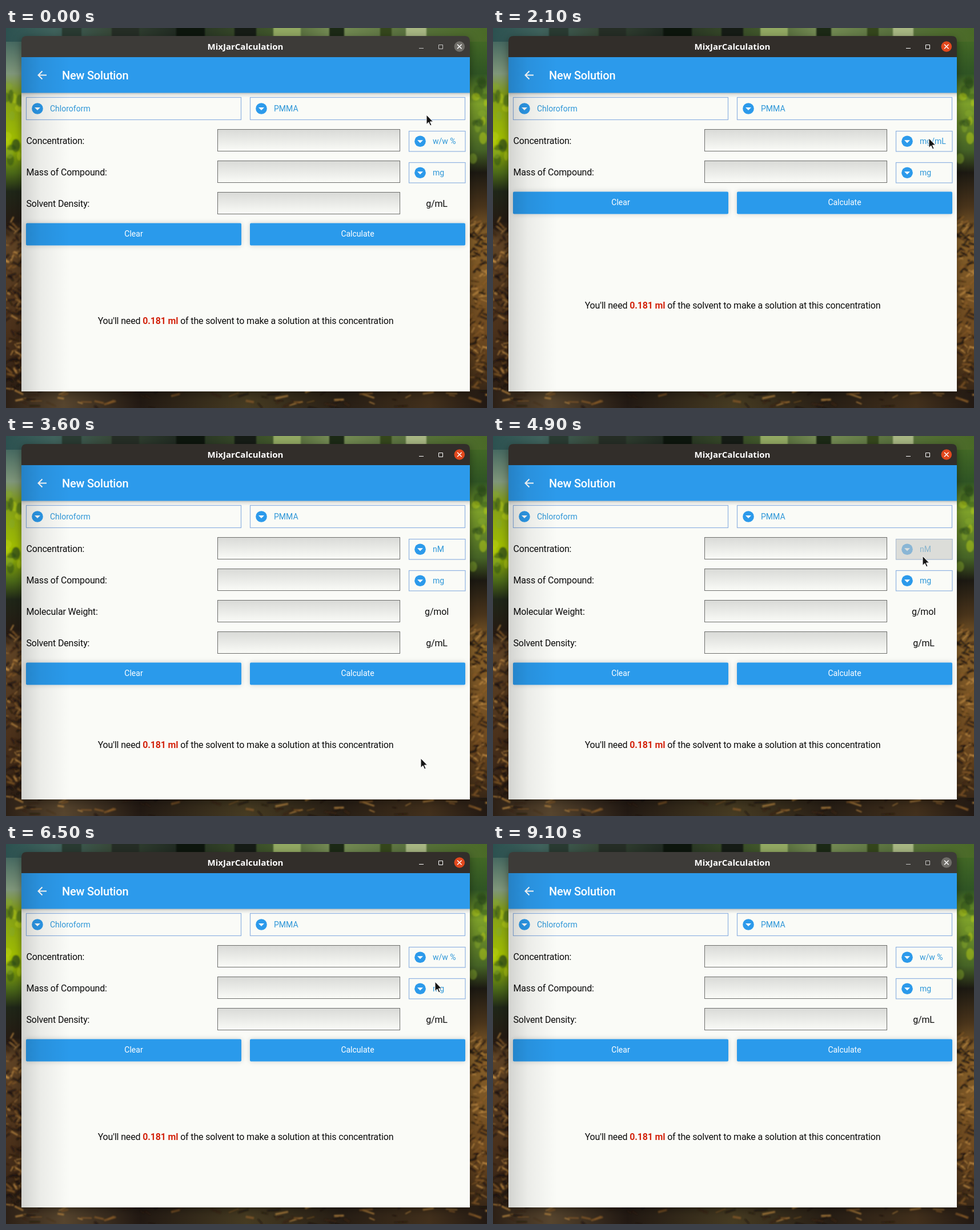
An HTML page for the animation above (9.2 s loop, 842x665 px).

```html
<!DOCTYPE html>
<html lang="en">
<head>
<meta charset="utf-8">
<title>New Solution</title>
<style>
  html, body { margin: 0; width: 100%; height: 100%; overflow: hidden; background: #2a2118; }
  #stage { display: block; width: 842px; height: 665px; }
  text { font: 16px Roboto, sans-serif; letter-spacing: -.01em; fill: #0b0b0b; white-space: pre; }
  .small { font-size: 14px; letter-spacing: 0; }
  .blue { fill: #2f97d8; }
  .white { fill: #fff; }
  .mid { text-anchor: middle; }
  .bar { font: 500 20px Roboto, sans-serif; }
  .caption { font: 700 15px "Open Sans", "Noto Sans", sans-serif; letter-spacing: 0; }
  .outline { fill: none; stroke: #8fb2e2; stroke-width: 1.2; }
  .field { fill: url(#fieldFill); stroke: #6d6e6c; }
</style>
</head>
<body>
<svg id="stage" viewBox="0 0 842 665">
  <defs>
    <linearGradient id="fieldFill" x2="0" y2="1">
      <stop offset="0" stop-color="#d9dad7"/><stop offset="1" stop-color="#fafbf7"/>
    </linearGradient>
    <linearGradient id="edgeShade">
      <stop offset="0" stop-opacity=".16"/><stop offset=".4" stop-opacity=".06"/><stop offset="1" stop-opacity="0"/>
    </linearGradient>
    <linearGradient id="barShade" x2="0" y2="1">
      <stop offset="0" stop-opacity=".24"/><stop offset=".4" stop-opacity=".09"/><stop offset="1" stop-opacity="0"/>
    </linearGradient>
    <linearGradient id="leftTone" x2="0" y2="1">
      <stop offset="0" stop-color="#2f5656"/><stop offset=".12" stop-color="#7f967a"/>
      <stop offset=".17" stop-color="#7f9a1c"/><stop offset=".3" stop-color="#a3c000"/>
      <stop offset=".38" stop-color="#4c6a18"/><stop offset=".43" stop-color="#1f2618"/>
      <stop offset=".51" stop-color="#251b13"/><stop offset=".56" stop-color="#5f4325"/>
      <stop offset=".8" stop-color="#4a301a"/><stop offset="1" stop-color="#241a13"/>
    </linearGradient>
    <linearGradient id="rightTone" x2="0" y2="1">
      <stop offset="0" stop-color="#4a7026"/><stop offset=".12" stop-color="#2f5424"/>
      <stop offset=".2" stop-color="#7da02a"/><stop offset=".32" stop-color="#466426"/>
      <stop offset=".38" stop-color="#1c1912"/><stop offset=".47" stop-color="#49341b"/>
      <stop offset=".55" stop-color="#86602a"/><stop offset=".82" stop-color="#6c4820"/>
      <stop offset="1" stop-color="#251b13"/>
    </linearGradient>
    <linearGradient id="topTone">
      <stop offset="0" stop-color="#2c5150"/><stop offset=".1" stop-color="#40635d"/>
      <stop offset=".22" stop-color="#384838"/><stop offset=".35" stop-color="#222c23"/>
      <stop offset=".55" stop-color="#40562b"/><stop offset=".68" stop-color="#788f57"/>
      <stop offset=".82" stop-color="#5b7340"/><stop offset="1" stop-color="#4a6a27"/>
    </linearGradient>
    <linearGradient id="bottomTone">
      <stop offset="0" stop-color="#2c2016"/><stop offset=".12" stop-color="#57452e"/>
      <stop offset=".28" stop-color="#221913"/><stop offset=".5" stop-color="#463b22"/>
      <stop offset=".7" stop-color="#271e15"/><stop offset=".88" stop-color="#42301c"/>
      <stop offset="1" stop-color="#221913"/>
    </linearGradient>
    <filter id="soft"><feGaussianBlur stdDeviation=".9"/></filter>
    <filter id="windowShadow" x="-5%" y="-5%" width="110%" height="112%">
      <feDropShadow dx="0" dy="4" stdDeviation="8" flood-opacity=".4"/>
    </filter>
    <filter id="buttonShadow" x="-10%" y="-40%" width="120%" height="180%">
      <feDropShadow dx="0" dy="0" stdDeviation="4" flood-opacity=".18"/>
    </filter>
    <filter id="menuShadow" x="-40%" y="-30%" width="180%" height="160%">
      <feDropShadow dx="0" dy="5" stdDeviation="15" flood-opacity=".38"/>
    </filter>
    <clipPath id="page"><path d="M27 51H812V636H27Z"/></clipPath>
  </defs>

  <g id="scenery">
    <path fill="url(#leftTone)" d="M0 0H30V665H0Z"/>
    <path fill="url(#rightTone)" d="M808 0H842V665H808Z"/>
    <path fill="url(#topTone)" d="M0 0H842V24H0Z"/>
    <path fill="url(#bottomTone)" d="M0 633H842V665H0Z"/>
    <g id="patches" filter="url(#soft)"></g>
  </g>

  <path d="M27 636V23Q27 14 36 14H803Q812 14 812 23V636Z" id="titleBar" filter="url(#windowShadow)"/>
  <text class="caption white mid" x="419" y="38">MixJarCalculation</text>
  <g id="controls" fill="none" stroke="#fff">
    <path d="M723 35.5H731M757.5 29.5H764.5V36.5H757.5Z"/>
  </g>
  <circle id="close" cx="793.8" cy="32.5" r="9.3"/>
  <path d="M790 28.7L797.6 36.3M797.6 28.7L790 36.3" stroke="#fff" stroke-width="1.5"/>

  <g clip-path="url(#page)">
    <path fill="#fafbf7" d="M27 51H812V636H27Z"/>
    <path fill="url(#barShade)" d="M27 113H812V122H27Z"/>
    <path fill="#2c9aeb" d="M27 51H812V113.5H27Z"/>
    <path d="M71 82.5H57M63.5 75.5L56.5 82.5L63.5 89.5" fill="none" stroke="#fff" stroke-width="2"/>
    <text class="bar white" x="98" y="89.5">New Solution</text>
    <g id="form"></g>
    <path fill="url(#edgeShade)" d="M27 51H112V636H27Z"/>
    <g id="menu">
      <rect id="menuBack" x="629" width="240" rx="6" fill="#f4f5f1" filter="url(#menuShadow)"/>
      <svg id="menuView" x="629" width="183"><g id="items"></g></svg>
    </g>
  </g>
  <g id="cursor">
    <path d="M1 1V17.5L4.9 13.9L7.6 20L10 18.9L7.4 13H12.6Z" fill="#151515" stroke="#fff"/>
  </g>
</svg>

<script>
const LOOP = 9200, STEP = 100;
const $ = id => document.getElementById(id);

function add(parent, tag, attrs = {}, content) {
  const el = document.createElementNS('http://www.w3.org/2000/svg', tag);
  for (const name in attrs) el.setAttribute(name, attrs[name]);
  if (content) el.textContent = content;
  return parent.appendChild(el);
}
const label = (parent, x, y, content, cls = '') => add(parent, 'text', { x, y, class: cls }, content);
const place = (el, x, y) => el.setAttribute('transform', `translate(${x} ${y})`);

function dropdown(parent, x, y, width, height, content) {
  const g = add(parent, 'g');
  place(g, x, y);
  const mid = height / 2;
  add(g, 'rect', { x: .5, y: .5, width: width - 1, height: height - 1, class: 'outline' });
  add(g, 'circle', { cx: 20, cy: mid, r: 9.8, fill: '#2c9aeb' });
  add(g, 'path', { d: `M15 ${mid - 2}h10l-5 5z`, fill: '#fff' });
  return { g, text: label(g, 42, mid + 5, content, 'small blue') };
}

function row(y, title, unit) {
  const g = add($('form'), 'g');
  place(g, 0, y);
  label(g, 35.5, 25.5, title);
  add(g, 'rect', { x: 370.5, y: .5, width: 319, height: 38, class: 'field' });
  if (unit) label(g, 754, 25.5, unit, 'mid');
  return g;
}

function button(parent, x, content) {
  add(parent, 'rect', { x, y: 0, width: 377, height: 39, rx: 2, fill: '#2c9aeb', filter: 'url(#buttonShadow)' });
  label(parent, x + 188.5, 23.5, content, 'small white mid');
}

const form = $('form');
dropdown(form, 35, 121, 377, 40, 'Chloroform');
dropdown(form, 427, 121, 377, 40, 'PMMA');
row(177, 'Concentration:');
row(232, 'Mass of Compound:');
const weightRow = row(287, 'Molecular Weight:', 'g/mol');
const densityRow = row(287, 'Solvent Density:', 'g/mL');
const unitBox = dropdown(form, 705, 180, 99.5, 36.5, '');
const pressTint = add(unitBox.g, 'rect', { width: 99.5, height: 36.5, fill: '#c9cac7' });
dropdown(form, 705, 235, 99.5, 36.5, 'mg');
const buttons = add(form, 'g');
button(buttons, 35, 'Clear');
button(buttons, 427, 'Calculate');
const result = label(form, 419.5, 0, '', 'mid');
add(result, 'tspan', {}, "You'll need ");
add(result, 'tspan', { fill: '#d3250f', 'font-weight': 700 }, '0.181 ml');
add(result, 'tspan', {}, ' of the solvent to make a solution at this concentration');

['w/w %', 'mg/mL', 'g/mL', 'M', 'mM', 'µM', 'nM'].forEach((unit, i, all) => {
  label($('items'), 71, i * 55 + 32, unit).style.fill = '#222';
  if (i < all.length - 1)
    add($('items'), 'path', { d: `M0 ${i * 55 + 54.5}h183`, stroke: '#dcddda', 'stroke-width': 1.5 });
});

// Blurred forest behind the window
let seed = 7;
const rand = (lo, hi) => {
  seed = (seed * 16807) % 2147483647;
  return lo + (hi - lo) * seed / 2147483647;
};
const pick = list => list[Math.floor(rand(0, list.length))];
const patches = $('patches');
for (const [x, width, fill] of [[98, 34, '#2b3a31'], [185, 48, '#252f25'], [298, 50, '#11150f'],
  [400, 38, '#151d12'], [468, 48, '#93aa64'], [566, 26, '#1f2a18'], [655, 20, '#34471f'], [700, 36, '#a9b884']])
  add(patches, 'rect', { x, y: -4, width, height: 24, fill });
for (let i = 0; i < 30; i++) {
  add(patches, 'ellipse', {
    cx: pick([rand(0, 26), rand(814, 842)]), cy: rand(90, 240), rx: rand(3, 9), ry: rand(4, 12),
    fill: pick(['#b9cf13', '#3a5c1c', '#86a82a', '#2c4a1a']), opacity: .5 });
}
function straw(x, y, dx, dy) {
  add(patches, 'path', {
    d: `M${x} ${y}l${dx} ${dy}`, stroke: pick(['#c08c45', '#17100b', '#8a5d28', '#20150d', '#3a2616']),
    'stroke-width': rand(1, 4), opacity: .7 });
}
for (let i = 0; i < 150; i++) {
  straw(rand(-6, 24), rand(340, 640), rand(4, 15), rand(-12, 12));
  straw(rand(808, 836), rand(330, 640), rand(4, 15), rand(-12, 8));
}
for (let i = 0; i < 60; i++) straw(rand(0, 842), rand(636, 665), rand(6, 24), rand(-8, 8));

// Time, x, y
const path = [
  [0, 735, 151], [200, 735, 151], [400, 760, 194], [800, 760, 194], [1200, 726, 301],
  [1500, 726, 301], [1900, 761, 194], [2000, 761, 194], [2100, 762, 192], [2300, 762, 192],
  [2600, 761, 243], [3000, 732, 551], [3200, 732, 551], [3400, 725, 563], [3800, 725, 563],
  [4800, 751, 209], [5200, 751, 209], [5600, 752, 238], [6400, 752, 238], [6500, 750, 240],
  [6700, 750, 240], [7000, 680, 232], [7700, 429, 313], [7900, 428, 324], [8600, 72, 61],
  [8700, 72, 61], [8800, 74, 63], [LOOP, 74, 63]
];
// Time, selected unit, molecular weight row, density row
const states = [[0, 'w/w %', 0, 1], [1400, 'mg/mL', 0, 0], [3600, 'nM', 1, 1], [5800, 'w/w %', 0, 1]];
// Press, menu closed
const openings = [[600, 1400], [2300, 3600], [4900, 5800]];

const clamp = v => Math.max(0, Math.min(1, v));
const show = (el, on) => el.setAttribute('display', on ? 'inline' : 'none');

function drawCursor(t) {
  const i = path.findIndex(p => p[0] > t);
  const [t0, x0, y0] = path[i - 1], [t1, x1, y1] = path[i];
  const k = (t - t0) / (t1 - t0);
  place($('cursor'), x0 + (x1 - x0) * k, y0 + (y1 - y0) * k);
  show($('cursor'), t < 9100);
}

function drawMenu(t) {
  const opening = openings.find(([press, end]) => t >= press && t < end);
  const age = opening ? t - opening[0] : 0;
  const grow = 1 - (1 - clamp((age - 100) / 270)) ** 3;
  const height = 384.5 * grow;
  show($('menu'), height > 0);
  for (const id of ['menuBack', 'menuView']) {
    $(id).setAttribute('y', 600.5 - height);
    $(id).setAttribute('height', height);
  }
  $('menu').setAttribute('opacity', grow);
  pressTint.setAttribute('opacity', opening ? .6 * clamp((600 - age) / 250) : 0);
}

function draw(now) {
  const t = Math.floor((now % LOOP) / STEP) * STEP;
  const focused = t >= 600 && t < 9100;
  $('titleBar').setAttribute('fill', focused ? '#302f2b' : '#3d3b37');
  $('close').setAttribute('fill', focused ? '#e2481d' : '#706e69');
  $('controls').setAttribute('opacity', focused ? 1 : .7);

  const [, unit, weight, density] = states.filter(s => s[0] <= t).pop();
  const extra = weight + density;
  unitBox.text.textContent = unit;
  show(weightRow, weight);
  show(densityRow, density);
  place(densityRow, 0, 287 + 55 * weight);
  place(buttons, 0, 286.5 + 55 * extra);
  result.setAttribute('y', 490.5 + 27.5 * extra);

  drawMenu(t);
  drawCursor(t);
}

const start = performance.now();
function tick() {
  draw(performance.now() - start);
  requestAnimationFrame(tick);
}
tick();
</script>
</body>
</html>
```
